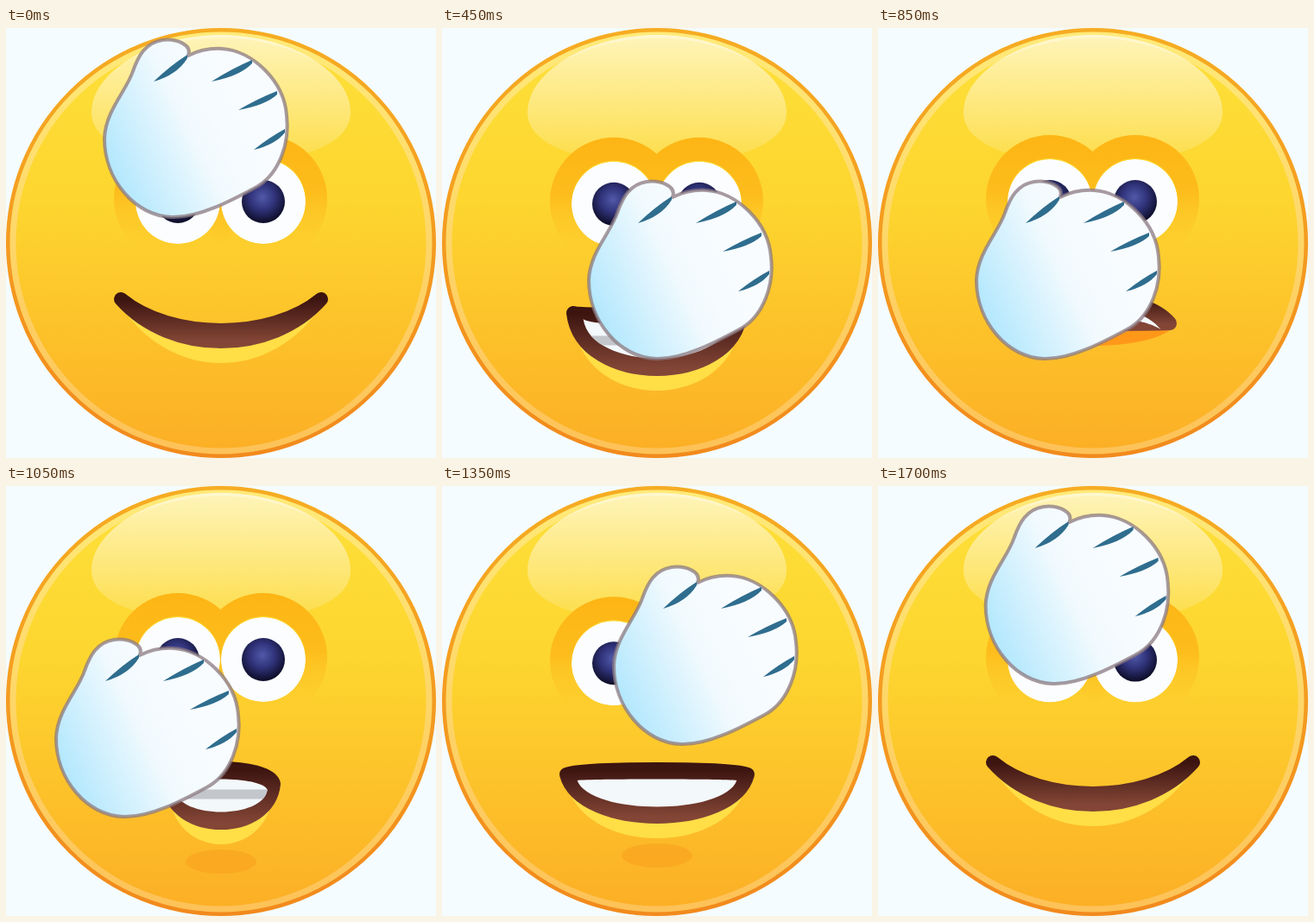
Animation, 498 px wide and 498 px high, one loop 1750 ms. Source, as an HTML page:

```html
<!DOCTYPE html>
<html>
<head>
<meta charset="utf-8">
<style>
html, body { margin: 0; width: 100%; height: 100%; overflow: hidden; background: #f5fcff; }
svg { display: block; width: 100vw; height: 100vh; }
</style>
</head>
<body>
<svg viewBox="0 0 498 498">
  <defs>
    <linearGradient id="skin" x2="0" y2="1">
      <stop offset="0" stop-color="#fde03a"/>
      <stop offset=".4" stop-color="#fdd62f"/>
      <stop offset="1" stop-color="#fcae25"/>
    </linearGradient>
    <linearGradient id="rim" x2="0" y2="1">
      <stop offset="0" stop-color="#f6ac22"/>
      <stop offset="1" stop-color="#f28a1c"/>
    </linearGradient>
    <linearGradient id="innerRim" x2="0" y2="1">
      <stop offset="0" stop-color="#ffea78"/>
      <stop offset="1" stop-color="#fdc258"/>
    </linearGradient>
    <linearGradient id="gloss" x2="0" y2="1">
      <stop offset="0" stop-color="#fff" stop-opacity=".65"/>
      <stop offset="1" stop-color="#fff" stop-opacity=".1"/>
    </linearGradient>
    <linearGradient id="socket" x2="0" y2="1">
      <stop offset="0" stop-color="#fdb515"/>
      <stop offset=".45" stop-color="#fdbd1c"/>
      <stop offset=".9" stop-color="#fdc729" stop-opacity="0"/>
    </linearGradient>
    <linearGradient id="lid" x2="0" y2="1">
      <stop offset="0" stop-color="#fed934"/>
      <stop offset="1" stop-color="#fdc124"/>
    </linearGradient>
    <radialGradient id="pupil" cx=".48" cy=".4" r=".58">
      <stop offset="0" stop-color="#5259a8"/>
      <stop offset=".5" stop-color="#30337a"/>
      <stop offset="1" stop-color="#0e0e2a"/>
    </radialGradient>
    <linearGradient id="lips" x2="0" y2="1">
      <stop offset="0" stop-color="#3c1410"/>
      <stop offset="1" stop-color="#834636"/>
    </linearGradient>
    <linearGradient id="glove" x1="0" y1=".75" x2=".75" y2=".4">
      <stop offset="0" stop-color="#aee6fd"/>
      <stop offset=".65" stop-color="#f2fafe"/>
      <stop offset="1" stop-color="#f8fcff"/>
    </linearGradient>
    <clipPath id="teethClip"><path id="teethClipPath"/></clipPath>
  </defs>

  <circle cx="249" cy="249" r="246.5" fill="url(#skin)" stroke="url(#rim)" stroke-width="5"/>
  <circle cx="249" cy="249" r="241" fill="none" stroke="url(#innerRim)" stroke-width="7"/>
  <path fill="url(#gloss)" d="M99 98C99 50 170 8 249 8S399 50 399 98C399 138 330 158 249 158S99 138 99 98Z"/>

  <g id="eyes"></g>

  <ellipse id="chin" cx="249" rx="41" ry="14" fill="#f79a1c"/>
  <path id="lowerLip"/>
  <path id="mouth" fill="url(#lips)" stroke="url(#lips)" stroke-width="16" stroke-linejoin="round"/>
  <path id="teeth" fill="#f3f8fb"/>
  <rect id="band" x="120" width="260" height="11" fill="#c3c6cb" clip-path="url(#teethClip)"/>

  <g id="hand">
    <path fill="url(#glove)" stroke="#8b7a80" stroke-opacity=".75" stroke-width="4" stroke-linejoin="round"
      d="M211 258C216 245 197 238 181 240C161 243 153 259 147 276C140 298 115 322 114 354
         C114 402 150 444 192 445C225 446 266 423 292 409C316 394 329 360 325 327
         C322 287 285 252 250 250C232 249 221 253 211 258Z"/>
    <path id="creases" fill="#2f6d8e"/>
  </g>
</svg>
<script>
const LOOP = 1750, STEP = 50;
const $ = id => document.getElementById(id);
const set = (id, attrs) => { for (const k in attrs) $(id).setAttribute(k, attrs[k]); };
const clamp = v => Math.min(1, Math.max(0, v));
const mix = (a, b, u) => a + (b - a) * u;

// Hand stops: [arrive, leave, x, y]
const stops = [
  [0, 0, 0, -226],       // forehead
  [200, 300, 0, 0],      // mouth
  [400, 700, 56, -62],   // right cheek
  [1000, 1100, -56, -62],// left cheek
  [1350, 1350, 85, -146],// right eye
  [LOOP, LOOP, 0, -226]
];
// Mouth poses: [arrive, leave, half width, corner height, sag, gape]
const mouths = [
  [0, 0, 116, 314, 36, 0],
  [200, 200, 118, 324, 2, 46],
  [450, 450, 97, 330, 2, 50],
  [850, 850, 89, 342, -29, 17],
  [1050, 1050, 61, 345, -18, 50],
  [1350, 1350, 105, 334, -6, 42],
  [1700, 1700, 116, 320, 36, 0],
  [LOOP, LOOP, 116, 314, 36, 0]
];

function sample(keys, t) {
  const i = keys.findIndex(key => key[0] > t);
  const [, leave, ...from] = keys[i - 1], [arrive, , ...to] = keys[i];
  const u = clamp((t - leave) / (arrive - leave));
  return from.map((v, k) => mix(v, to[k], u));
}

// Two arcs between shared corners, passing through the given mid heights.
function crescent(half, corner, top, bottom, inset) {
  const l = 249 - half, r = 249 + half, d = inset * 2 * half;
  const ctrl = mid => (4 * mid - corner) / 3;
  return `M${l} ${corner}C${l + d} ${ctrl(top)} ${r - d} ${ctrl(top)} ${r} ${corner}` +
    `C${r - d} ${ctrl(bottom)} ${l + d} ${ctrl(bottom)} ${l} ${corner}Z`;
}

function crease(x, y, dx, dy) {
  return `M${x} ${y}q${-dx * .5} ${dy * .4} ${-dx} ${dy}q${dx * .7} ${-dy * .25} ${dx} ${4 - dy}Z`;
}

const eyeCentres = [199, 298];
$('eyes').innerHTML =
  eyeCentres.map(x => `<circle cx="${x}" cy="198" r="74" fill="url(#socket)"/>`).join('') +
  eyeCentres.map(x => `<circle cx="${x}" cy="200" r="49" fill="url(#lid)"/>
    <clipPath id="open${x}"><ellipse class="opening" cx="${x}" cy="201" rx="49"/></clipPath>
    <g clip-path="url(#open${x})">
      <circle cx="${x}" cy="201" r="49" fill="#fbfdff"/>
      <circle cx="${x}" cy="201" r="25" fill="url(#pupil)"/>
    </g>`).join('');
const openings = document.querySelectorAll('.opening');

set('creases', { d: crease(210, 257, 39, 31) + crease(285, 263, 47, 25) +
  crease(314, 299, 45, 22) + crease(323, 343, 36, 24) });

function drawMouth([half, corner, sag, gape]) {
  const top = corner + sag, bottom = top + 13 + gape;
  const middle = (top + bottom) / 2, inset = .25 - .004 * gape;
  const teeth = crescent(half * .88, corner + 7, middle - .38 * gape, middle + .38 * gape, inset);
  const frown = clamp((-sag - 18) / 11);
  set('mouth', { d: crescent(half, corner, top, bottom, inset) });
  set('teeth', { d: teeth });
  set('teethClipPath', { d: teeth });
  set('band', { y: middle - 7, opacity: clamp((gape - 46) / 4) });
  set('lowerLip', {
    d: crescent(half, corner + 8, bottom, bottom + 25, inset),
    fill: `rgb(255 ${mix(222, 152, frown)} ${mix(70, 25, frown)})`
  });
  set('chin', { cy: bottom + 45, opacity: .45 * clamp(-sag / 6) * clamp((gape - 17) / 25) });
}

function draw(t) {
  const [x, y] = sample(stops, t);
  set('hand', { transform: `translate(${x} ${y})` });

  // Eyes narrow while the hand covers the mouth and sink as it moves right.
  const squint = clamp(2 - Math.abs(t - 250) / 75);
  openings.forEach(e => e.setAttribute('ry', mix(49, 21, squint)));
  set('eyes', { transform: `translate(0 ${Math.max(0, x) * .05})` });

  drawMouth(sample(mouths, t));
}

function tick() {
  draw(Math.floor(performance.now() % LOOP / STEP) * STEP);
  requestAnimationFrame(tick);
}
tick();
</script>
</body>
</html>
```
